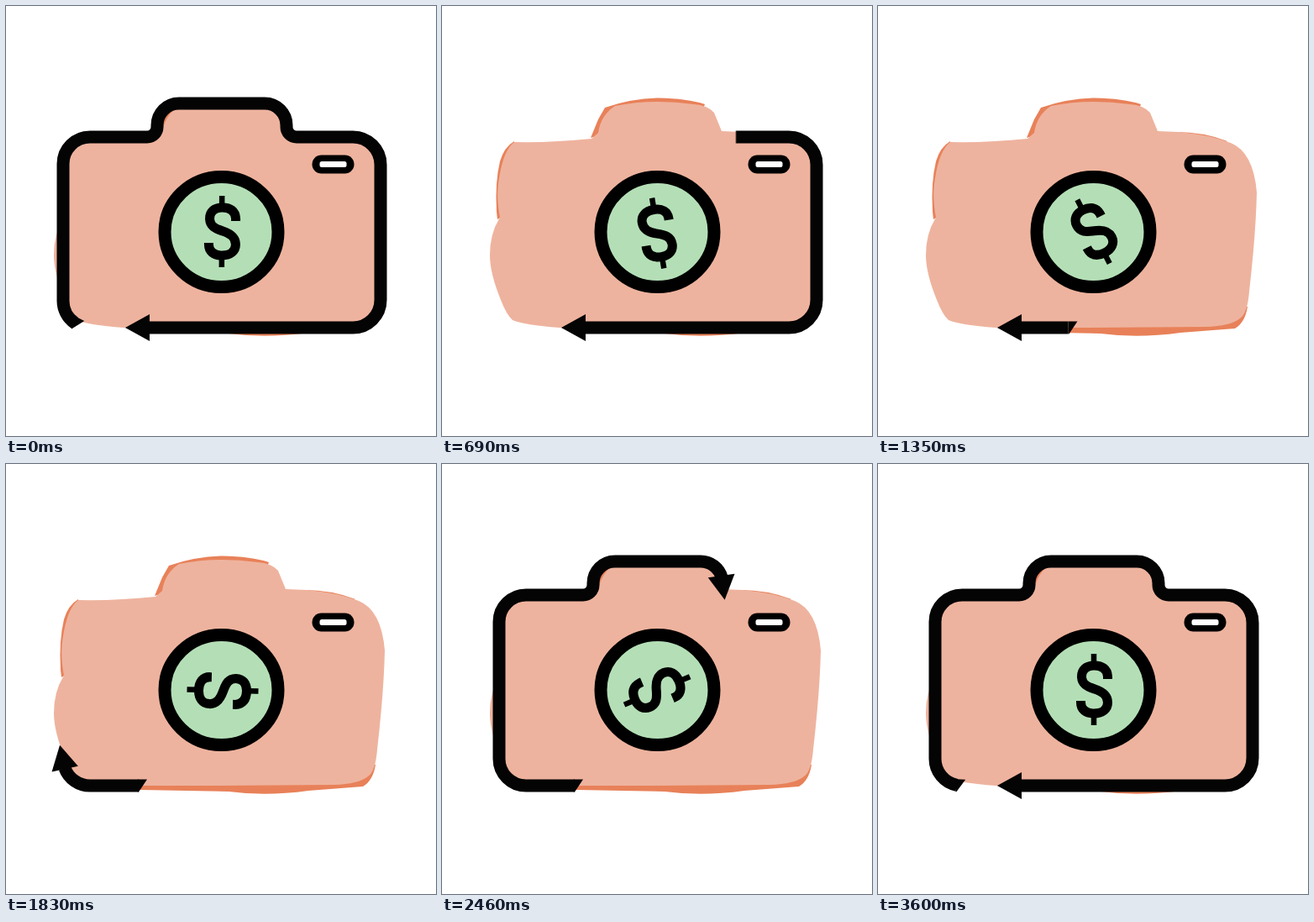
Animation of 512x512 px, one loop 3630 ms. Source, as an HTML page:

```html
<!DOCTYPE html>
<html lang="en">
<head>
<meta charset="utf-8">
<title>Camera</title>
<style>
  html, body { margin: 0; width: 100%; height: 100%; overflow: hidden; background: #fff; }
  svg { display: block; width: 100%; height: 100%; }
  .soft { filter: blur(.6px); }
</style>
</head>
<body>
<svg viewBox="0 0 512 512">
  <!-- orange underlay, then salmon body -->
  <g fill="#e88159">
    <path d="M177 157L186 135L194 121Q226 110 258 109.500Q292 110 313 117L300 150H200Z"/>
    <path d="M355 150Q388 150 416 161L390 175Z"/>
    <path d="M86 161Q74 168 69 185Q63 210 65 245L66 254L90 240Z"/>
    <path d="M130 380L160 388L265 390Q310 396 360 389L425 384Q437 377 440 358L400 350Z"/>
  </g>
  <path fill="#eeb39e" d="M86 162Q130 163 178 158L186 151Q189 130 206 119Q250 110 300 117Q316 118 324 127L333 149
    L358 150Q395 153 420 163Q447 174 451 222Q450 270 442 340Q440 366 431 372Q420 381 390 382L245 383L140 383
    Q98 380 84 374Q77 368 70 350Q57 318 57 297Q57 270 69 252Q64 225 68 205Q73 172 86 162Z"/>

  <g class="soft">
    <ellipse cx="256.500" cy="269" rx="67.500" ry="65.500" fill="#b4dfb6" stroke="#000" stroke-width="15"/>
    <rect x="364.500" y="177.500" width="50" height="22" rx="11"/>
    <rect x="373.500" y="185" width="32" height="7" rx="2.500" fill="#fff"/>
  </g>

  <g id="dollar" fill="none" stroke="#000">
    <path stroke-width="11" d="M273.500 256V253C273 244 267 240 257.500 240C248 240 242.500 245 242.500 253
      C242.500 262 249 265 258 268C267 271 273.500 275 273.500 284C273.500 292 267 297 257.500 297
      C247 297 241.500 292 241.500 284V282"/>
    <path stroke-width="6.500" d="M257 226V239M257 298V311"/>
  </g>

  <path id="outline" fill="none" stroke="#040404" stroke-width="15" d="M163 383H100A32 32 0 0 1 68 351V188
    A32 32 0 0 1 100 156H168A12 12 0 0 0 180 144V142A26 26 0 0 1 206 116H308A26 26 0 0 1 334 142V144
    A12 12 0 0 0 346 156H413A33 33 0 0 1 446 189V350A33 33 0 0 1 413 383Z"/>
  <path id="tailCap" fill="#040404"/>
  <path id="arrow" fill="#040404" d="M-1 -16L28 0L-1 16Z"/>
</svg>
<script>
const LOOP = 3630;
const [dollar, outline, tailCap, arrow] =
  ['dollar', 'outline', 'tailCap', 'arrow'].map(id => document.getElementById(id));
const length = outline.getTotalLength();

const clamp = x => Math.min(1, Math.max(0, x));
const ease = x => (1 - Math.cos(Math.PI * clamp(x))) / 2;
const wrap = s => (s % length + length) % length;
const pointAt = s => outline.getPointAtLength(wrap(s));

// Puts an element on the outline, aimed at the point `reach` further on
function place(element, s, reach) {
  const p = pointAt(s), q = pointAt(s + reach);
  const angle = Math.atan2(q.y - p.y, q.x - p.x);
  element.setAttribute('transform', `translate(${p.x} ${p.y}) rotate(${angle * 180 / Math.PI})`);
  return angle;
}

function draw() {
  const t = performance.now() % LOOP;
  // The tail erases one lap, then the head redraws it and stops just short of the easing's end
  const tail = length * ease((t + 323) % LOOP / 1980);
  const head = length * clamp(1.06 * ease((t - 1423) / 2160)) - 7;

  // The cut end leans where the line runs leftwards
  const lean = 5 * Math.max(0, -Math.cos(place(tailCap, tail, 1)));
  tailCap.setAttribute('d', `M${lean + 1} 7.500H${-lean}L${lean} -7.500H${lean + 1}Z`);

  const start = tail + lean;
  const visible = wrap(head - start);
  outline.setAttribute('stroke-dasharray', `${visible} ${length - visible}`);
  outline.setAttribute('stroke-dashoffset', -start);

  place(arrow, head, 9);
  dollar.setAttribute('transform', `rotate(${720 * clamp(t / 2920)} 257 269.500)`);
  requestAnimationFrame(draw);
}
draw();
</script>
</body>
</html>
```
